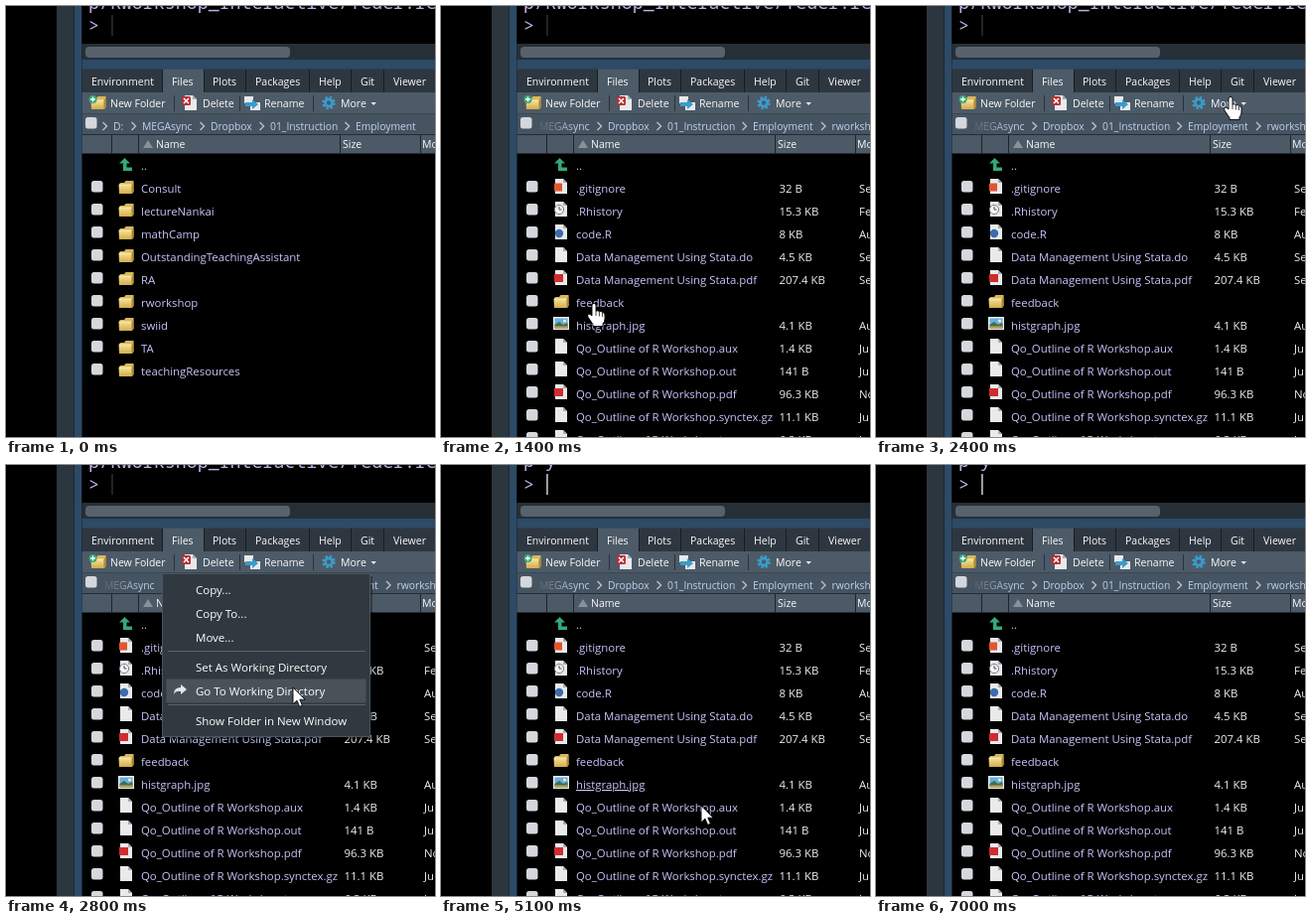
Write an HTML page that moves like this. It is 432 px wide and 434 px high and loops after 7100 ms.

```html
<!DOCTYPE html>
<html lang="en">
<head>
<meta charset="utf-8">
<title>File pane</title>
<style>
html, body { margin: 0; width: 100%; height: 100%; overflow: hidden; background: #000; }
svg { display: block; width: 432px; height: 434px; }
text { font-family: "Open Sans", "Noto Sans", sans-serif; font-size: 11.4px; white-space: pre; }
.ui { font-size: 10.5px; fill: #fafbfc; }
.crumb { font-size: 10.3px; fill: #c0d2ee; }
.name { fill: #c6c5fb; }
.val { fill: #eeeef4; }
.menu { font-size: 11.5px; fill: #fff; }
.mono { font-family: "Noto Sans Mono", "DejaVu Sans Mono", monospace; font-size: 18.3px; font-weight: 500; fill: #c3aee8; }
</style>
</head>
<body>
<svg id="stage" viewBox="0 0 432 434"></svg>
<script>
const LOOP = 7100;
const stage = document.getElementById('stage');

const rect = (x, y, w, h, fill, extra = '') =>
  `<rect x="${x}" y="${y}" width="${w}" height="${h}" fill="${fill}" ${extra}/>`;
const text = (x, y, cls, s, extra = '') => `<text x="${x}" y="${y}" class="${cls}" ${extra}>${s}</text>`;
const path = (d, fill, extra = '') => `<path d="${d}" fill="${fill}" ${extra}/>`;
const line = (d, stroke, w = 1) => path(d, 'none', `stroke="${stroke}" stroke-width="${w}"`);
const use = (id, x, y) => `<use href="#${id}" x="${x}" y="${y}"/>`;
const group = (id, body) => `<g id="${id}">${body}</g>`;

const page = path('M2 0H10L14 4V15H2Z', '#e9eaec') + path('M10 0V4H14Z', '#a9adb2');
const icons = {
  check: rect(0, 0, 11.5, 11.5, '#d4d7dc', 'rx="2.5"'),
  folder: path('M1 5L2.5 4H6L7.5 2H15.5V13L14 15H1Z', '#d8b75c') +
    path('M0.5 6H13.5V15H1Z', 'url(#gold)') + path('M13.5 6L15.5 3.5V13L13.5 15Z', '#b08a34') +
    line('M1 6H13.5', '#fbeeb0'),
  page,
  git: page + rect(1, 4.5, 8, 8, '#e0552f'),
  rfile: page + '<circle cx="6" cy="9" r="4.2" fill="#3c6cab"/>',
  pdf: page + rect(1, 4, 9, 8, '#cf2c2e'),
  clock: page + '<circle cx="6" cy="8" r="4.6" fill="#f6f7f8" stroke="#757c8a"/>' + line('M6 5V8H8.5', '#454b58'),
  image: rect(0, 1, 16, 13, '#eceef0') + rect(1.5, 2.5, 13, 10, '#68aee0') +
    path('M1.5 9L6 6L10 9L14.5 7V12.5H1.5Z', '#3e6f4f') + rect(1.5, 10.5, 13, 2, '#d2a04d') +
    '<circle cx="11.5" cy="5" r="1.5" fill="#fff2b0"/>',
  up: path('M5.5 0L11 5.5H7.5V9.5H13V13H4V5.5H0Z', '#35a878'),
  chev: line('M0 0L4 4L0 8', '#b4c0cf', 1.4),
  gear: '<circle cx="7" cy="7" r="5" fill="none" stroke="#3a9cca" stroke-width="3.4" stroke-dasharray="2.2 1.73"/>' +
    '<circle cx="7" cy="7" r="3.5" fill="none" stroke="#3a9cca" stroke-width="2.6"/>',
  arrow: path('M0 0V17L4 13.2L6.6 19.4L9.4 18.2L6.8 12.2H12.2Z', '#fff', 'stroke="#000" stroke-width=".9"'),
  hand: path('M-2 2Q0 -1.6 2 2V8.2Q4 7 5.4 8.8Q7.5 7.8 8.6 9.8Q11 9 11 12V16Q11 19 9 21V23.5H-1V21.5L-5.8 14.5Q-7 12.3 -5.5 11.2Q-4 10.6 -2 13Z',
    '#fff', 'stroke="#000" stroke-width=".9"') + line('M2 8V13M5.4 9V13.5M8.5 10V14', '#333', .9)
};
const defs = `<defs>
  <linearGradient id="gold" x2="0" y2="1"><stop stop-color="#f5e09a"/><stop offset="1" stop-color="#d3ac4a"/></linearGradient>
  <linearGradient id="fade"><stop stop-color="#465462"/><stop offset="1" stop-color="#465462" stop-opacity="0"/></linearGradient>
  <clipPath id="crumbs"><rect x="95" y="108" width="337" height="21"/></clipPath>
  ${Object.entries(icons).map(([id, body]) => group(id, body)).join('')}</defs>`;

function consolePane() {
  return rect(51, 0, 17, 434, '#2c363f') + rect(68, 0, 8.5, 434, '#2d4a66') + line('M68.5 0V434', '#1b2733') +
    rect(76.5, 0, 356, 39, '#000') + rect(76.5, 38, 356, 15.5, '#272f36') +
    rect(80, 41, 206, 11, '#58626c', 'rx="4"') + rect(76.5, 53.5, 356, 11, '#2d4a66') +
    text(83, 3, 'mono', 'p/Rworkshop_Interactive/feder.re', 'id="oldLine"') +
    text(83, 1.5, 'mono', 'p y', 'id="newLine"') +
    text(83, 25.5, 'mono', '&gt;', 'id="prompt"') + rect(0, 9, 1.5, 21, '#cfd0d8', 'id="caret"');
}

function tabs() {
  const labels = [['Environment', 86], ['Files', 167], ['Plots', 208], ['Packages', 251],
    ['Help', 315], ['Git', 357], ['Viewer', 390]];
  const edges = [157.5, 199.5, 241.5, 305.5, 347.5, 380.5];
  return rect(76.5, 63.5, 356, 24, '#2e3740') + rect(158, 63.5, 41, 24, '#4d5a67') +
    edges.map(x => line(`M${x} 64V87`, '#151c23')).join('') +
    labels.map(([s, x]) => text(x, 80, 'ui', s)).join('');
}

function toolbar() {
  const labels = [['New Folder', 105], ['Delete', 198], ['Rename', 260], ['More', 337]];
  return rect(76.5, 87, 356, 21, '#4d5a67') +
    [169.5, 235.5, 309.5].map(x => line(`M${x} 90V106`, '#28323b')).join('') +
    use('folder', 85, 89) + '<circle cx="87.5" cy="94" r="4" fill="#35a878"/>' +
    line('M85 94H90M87.5 91.5V96.5', '#fff', 1.3) +
    `<g transform="translate(178 90)">${page}</g>` + rect(177, 91, 9, 9, '#b92f35', 'rx="1.5"') +
    line('M179 93L184 98M184 93L179 98', '#fff', 1.5) +
    rect(240, 91, 9, 7, '#e7e9eb') + rect(246, 97, 10, 8, '#e7e9eb') +
    path('M241 97H248V94L254 99L248 104V101H241Z', '#3a9cca') +
    use('gear', 318, 90.5) + path('M367.5 97H373L370.2 100Z', '#e3e6e9') +
    labels.map(([s, x]) => text(x, 102, 'ui', s)).join('');
}

function crumbBar() {
  const parts = [['D:', 108], ['MEGAsync', 137], ['Dropbox', 206], ['01_Instruction', 266],
    ['Employment', 352], ['rworkshop', 431.5]];
  const trail = parts.map(([s, x], i) => `<g ${i > 4 ? 'id="lastCrumb"' : ''}>` +
    use('chev', x - 10.5, 117) + text(x, 125, 'crumb', s) + '</g>').join('');
  return rect(76.5, 108, 356, 21, '#465462') + line('M76.5 108.5H432', '#3a4652') +
    `<g clip-path="url(#crumbs)">${group('trail', trail)}</g>` +
    rect(95, 110, 42, 18, 'url(#fade)', 'id="crumbFade"') + use('check', 80, 112);
}

function header() {
  return rect(76.5, 129, 356, 19.5, '#4c5966') + line('M76.5 129.5H432', '#222c35') +
    [106.5, 133.5, 336.5, 417.5].map(x => line(`M${x} 130V148.5`, '#1c252d')).join('') +
    path('M138 143L143 135L148 143Z', '#87929d') + text(151, 143, 'ui', 'Name') +
    text(339, 143, 'ui', 'Size') + text(419, 143, 'ui', 'Modified');
}

const parent = ['Consult', 'lectureNankai', 'mathCamp', 'OutstandingTeachingAssistant', 'RA',
  'rworkshop', 'swiid', 'TA', 'teachingResources'].map(s => [s, 'folder']);
const doc = 'Qo_Outline of R Workshop';
const child = [
  ['.gitignore', 'git', '32 B', 'Sep'], ['.Rhistory', 'clock', '15.3 KB', 'Feb'],
  ['code.R', 'rfile', '8 KB', 'Aug'], ['Data Management Using Stata.do', 'page', '4.5 KB', 'Sep'],
  ['Data Management Using Stata.pdf', 'pdf', '207.4 KB', 'Sep'], ['feedback', 'folder'],
  ['histgraph.jpg', 'image', '4.1 KB', 'Aug'], [doc + '.aux', 'page', '1.4 KB', 'Jun'],
  [doc + '.out', 'page', '141 B', 'Jun'], [doc + '.pdf', 'pdf', '96.3 KB', 'Nov'],
  [doc + '.synctex.gz', 'page', '11.1 KB', 'Jun'], [doc + '.tex', 'page', '6.3 KB', 'Jun']
];

function fileList(id, rows) {
  return group(id, rows.map(([name, icon, size = '', date = ''], i) => {
    const y = 188 + 23 * i;
    return use('check', 86, y - 12) + use(icon, 113, y - 14) +
      text(136, y, 'name', name, `data-name="${name}"`) +
      text(340.5, y, 'val', size) + text(421, y, 'val', date);
  }).join(''));
}

const items = [['Copy...', 126], ['Copy To...', 150], ['Move...', 174],
  ['Set As Working Directory', 204], ['Go To Working Directory', 228], ['Show Folder in New Window', 258]];

function menu() {
  return group('menu', rect(160, 112, 209, 164, '#000', 'opacity=".35"') +
    rect(157.5, 109.5, 209, 164, '#30393f', 'stroke="#4b555d"') +
    rect(161.5, 0, 201, 24, '#4a5259', 'id="hover"') +
    line('M163 187.5H362M163 241.5H362', '#59636b') +
    path('M169 231Q169 224 176 224V221L182 226L176 231V228Q171 227 169 231Z', '#e4e7e9') +
    items.map(([s, y]) => text(191, y + 4, 'menu', s)).join(''));
}

stage.innerHTML = defs + rect(0, 0, 432, 434, '#000') + consolePane() + tabs() + toolbar() + crumbBar() +
  header() + use('up', 114, 153) + text(136, 165, 'name', '..') +
  fileList('parentList', parent) + fileList('childList', child) + menu() +
  group('pointer', use('arrow', 0, 0));

const $ = id => document.getElementById(id);
const show = (el, on) => el.setAttribute('visibility', on ? 'visible' : 'hidden');
const within = (t, a, b) => t >= a && t < b;
const clamp = v => Math.max(0, Math.min(1, v));
const named = s => stage.querySelector(`[data-name="${s}"]`);
const underline = (el, on) => el.setAttribute('text-decoration', on ? 'underline' : 'none');
const folderLink = named('rworkshop'), imageLink = named('histgraph.jpg');
const glyph = $('pointer').firstChild;

// time, x, y of the pointer tip
const route = [[100, 320, 440], [750, 154, 299], [1400, 154, 299], [1950, 357, 91], [2500, 357, 91],
  [2800, 289, 224], [3200, 287, 202], [4800, 287, 202], [5000, 200, 319], [5100, 262, 343],
  [5500, 268, 442]];

function pointerAt(t) {
  const i = route.findIndex(k => k[0] > t);
  if (i < 1) return null;
  const [t0, x0, y0] = route[i - 1], [t1, x1, y1] = route[i];
  const u = (t - t0) / (t1 - t0), e = u * u * (3 - 2 * u);
  return [x0 + (x1 - x0) * e, y0 + (y1 - y0) * e];
}

function caretAlpha(t) {
  if (t < 3800) return .22;
  if (t < 4300) return 1;
  const p = t % 1000;
  return p < 750 ? 1 - clamp((p - 380) / 180) : clamp((p - 750) / 200);
}

function draw(t) {
  const inside = t >= 1200, ran = t >= 3800, ready = t < 3800 || t >= 3950;
  show($('parentList'), !inside);
  show($('childList'), inside);
  show($('lastCrumb'), inside);
  show($('crumbFade'), inside);
  $('trail').setAttribute('transform', `translate(${inside ? -38 : 0} 0)`);

  show($('oldLine'), !ran);
  show($('newLine'), ran);
  show($('prompt'), ready);
  $('caret').setAttribute('x', ready ? 106.2 : 83.2);
  $('caret').setAttribute('opacity', caretAlpha(t));

  underline(folderLink, within(t, 700, 1200));
  underline(imageLink, within(t, 4950, 5200));

  const tip = pointerAt(t), open = within(t, 2450, 3800);
  show($('pointer'), tip);
  if (tip) {
    const hand = within(t, 700, 1450) || within(t, 1900, 2550) || within(t, 3800, 3950) || within(t, 4950, 5050);
    glyph.setAttribute('href', hand ? '#hand' : '#arrow');
    $('pointer').setAttribute('transform', `translate(${tip[0]} ${tip[1]})`);
  }
  show($('menu'), open);
  const item = open && tip && items.find(([, y]) => Math.abs(tip[1] - y) <= 12);
  show($('hover'), item);
  if (item) $('hover').setAttribute('y', item[1] - 12.5);
}

const start = performance.now();
function tick() {
  draw((performance.now() - start) % LOOP);
  requestAnimationFrame(tick);
}
tick();
</script>
</body>
</html>
```
